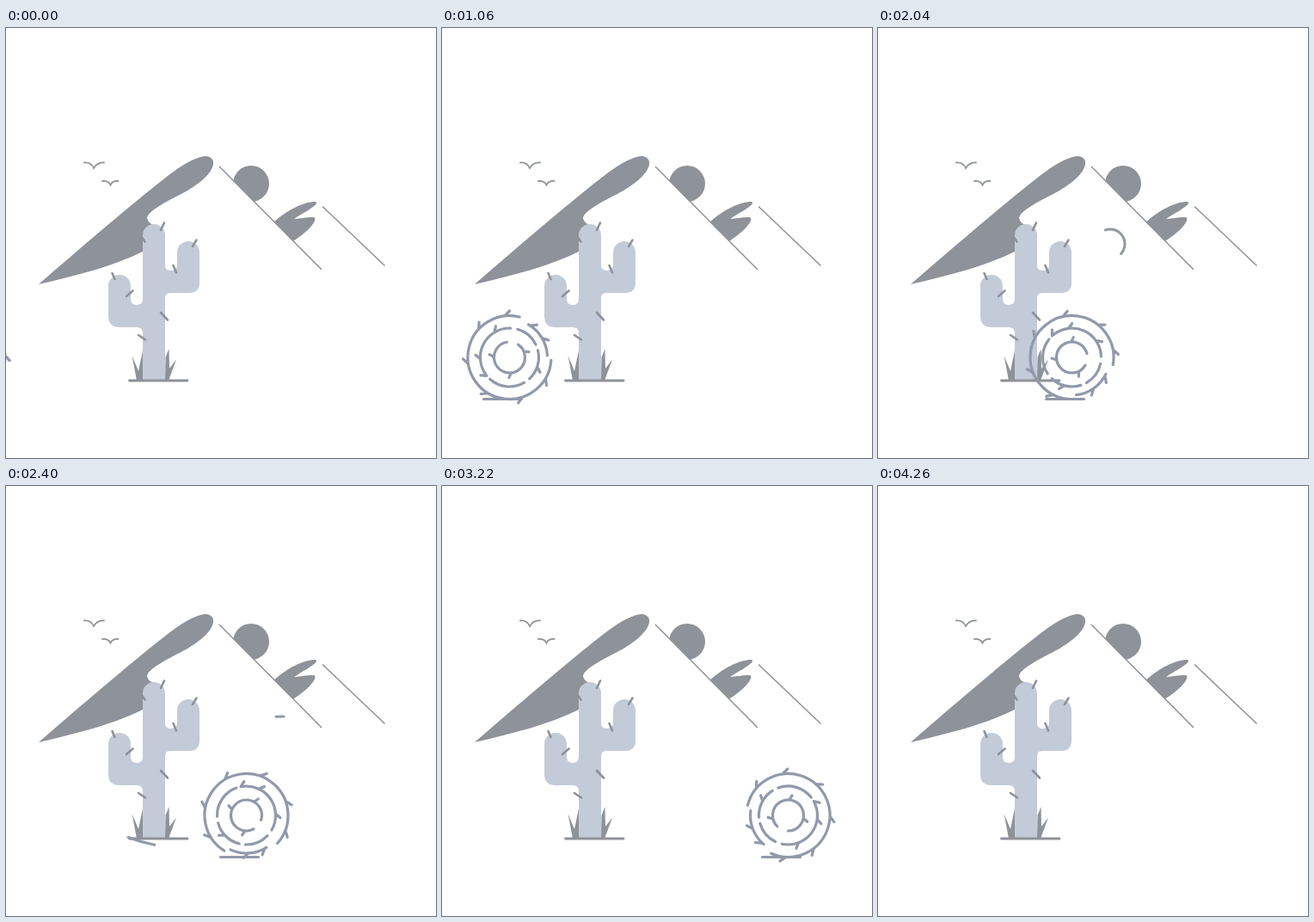
Write an HTML page that moves like this. It is 500x500 px and loops after 4460 ms.

```html
<!DOCTYPE html>
<html lang="en">
<head>
<meta charset="utf-8">
<title>Desert</title>
<style>
  html, body { margin: 0; width: 100%; height: 100%; overflow: hidden; background: #fff; }
  svg { display: block; width: 100%; height: 100%; }
  .line { fill: none; stroke: #8e9299; stroke-linecap: round; }
  .weed { fill: none; stroke: #9199aa; stroke-width: 3.2; stroke-linecap: round; }
  .gust { fill: none; stroke: #9199a6; stroke-width: 3; stroke-linecap: round; }
</style>
</head>
<body>
<svg viewBox="0 0 500 500">
  <clipPath id="slope"><path d="M248 161 L367 281 H500 V100 H248Z"/></clipPath>

  <g fill="#8e9299">
    <path d="M38 298 C98 246 152 200 190 170.500 C209 156 224 149 233 149 C240 150 243 155 240 162
             C236 173 219 185 203 193.500 C186 202 165 213 164 221 C165 226 169 228 173 230 L160 259.500
             C125 277 85 287 38 298Z"/>
    <g clip-path="url(#slope)">
      <circle cx="285" cy="181" r="21"/>
      <path d="M310 227 C326 212 346 202 360 202 C366 205 345 215 335 222 C344 222 352 219 359 220.500
               C362 226 347 240 332 249Z"/>
    </g>
  </g>
  <g class="line" stroke-width="1.5" style="stroke-linecap:butt">
    <path d="M248 161 L367 281"/>
    <path d="M368 207.500 L440.500 276.500"/>
  </g>
  <g class="line" stroke-width="1.8">
    <path d="M91 156.500 Q99 156 102 163 Q106 156 114 156.500"/>
    <path d="M112 178 Q119 177.500 121.500 182.500 Q124 177.500 130.500 178"/>
  </g>

  <path fill="#c4cbd8" d="M159 409 V355 Q159 348 152 348 H132 Q119 348 119 335 V300 A13 13 0 0 1 145 300
    V315 Q145 322 152 322 Q159 322 159 315 V241 A13 13 0 0 1 185 241 V276 Q185 282 192 282
    Q199 282 199 275 V261 A13 13 0 0 1 225 261 V296 Q225 308 213 308 H191 Q185 308 185 314 V409Z"/>
  <path class="line" stroke-width="2.600" d="M180 235 L184 226.500 M158.500 244 L161.500 248.500 M123.500 285 L126.500 292
    M140 312 L147.500 305.500 M194.500 276 L198 284.500 M217 254 L221.500 246.500
    M180 331 L188 339.500 M154 357 L162 362.500"/>
  <path fill="#8e9299" d="M152 410 L146.500 381 L154 399 L159 375 V410Z
    M185 410 L185.500 383 L189.500 373 L190 396 L198 385.500 L189 410Z"/>
  <path class="line" stroke-width="2.800" d="M143.500 410 H211"/>

  <path class="gust" pathLength="272" d="M172 221 C203 247 230 268 270 268 A17 17 0 1 0 253 251
    A17 17 0 0 0 270 268 C290 270 306 268 323 268"/>
  <path class="gust" d="M142 408.500 C190 427 220 417 253 417 A12.500 12.500 0 1 0 240.500 404.500
    A12.500 12.500 0 0 0 253 417 H320"/>

  <g id="tumble" class="weed">
    <path d="M-30 48.500 H14"/>
    <path id="rings"/>
  </g>
</svg>
<script>
const LOOP = 4460, SPEED = 0.15, SPIN = 0.088, DASH = 45, GUST_SPEED = 0.38;
const gustStarts = [1590, 2316];
const tumble = document.getElementById('tumble');
const rings = document.getElementById('rings');
const gusts = document.querySelectorAll('.gust');

const point = (r, deg) => {
  const a = deg * Math.PI / 180;
  return `${(r * Math.cos(a)).toFixed(2)} ${(r * Math.sin(a)).toFixed(2)}`;
};
const arc = (r, from, to) =>
  `M${point(r, from)} A${r} ${r} 0 ${to - from > 180 ? 1 : 0} 1 ${point(r, to)}`;
const thorn = (r, deg) => `M${point(r, deg - 3)} L${point(r + 5.5, deg + 4)}`;

// Each ring: radius, arc spans, thorn angles
const layout = [
  [48.5, [[122, 402]], [24, 151, 193, 242, 292, 343]],
  [44, [[58, 115]], [64, 90]],
  [34, [[44, 92], [104, 165], [178, 250], [262, 390]], [0, 140, 262, 298]],
  [18, [[62, 378]], [98, 205, 302]],
];
rings.setAttribute('d', layout.map(([r, spans, thorns]) =>
  spans.map(([a, b]) => arc(r, a, b)).join('') +
  thorns.map(a => thorn(r, a)).join('')).join(''));

function draw(now) {
  const t = Math.max(205, Math.floor(now % LOOP / 20) * 20);
  tumble.setAttribute('transform', `translate(${279.5 + (t - 2400) * SPEED} 383)`);
  rings.setAttribute('transform', `rotate(${(t - 2400) * SPIN})`);
  gusts.forEach((gust, i) => {
    const head = (t - gustStarts[i]) * GUST_SPEED;
    const length = gust.pathLength.baseVal || gust.getTotalLength();
    gust.style.display = head > 0 && head - DASH < length ? '' : 'none';
    gust.style.strokeDasharray = `${DASH} 2000`;
    gust.style.strokeDashoffset = DASH - head;
  });
  requestAnimationFrame(() => draw(performance.now() - start));
}
const start = performance.now();
draw(0);
</script>
</body>
</html>
```
